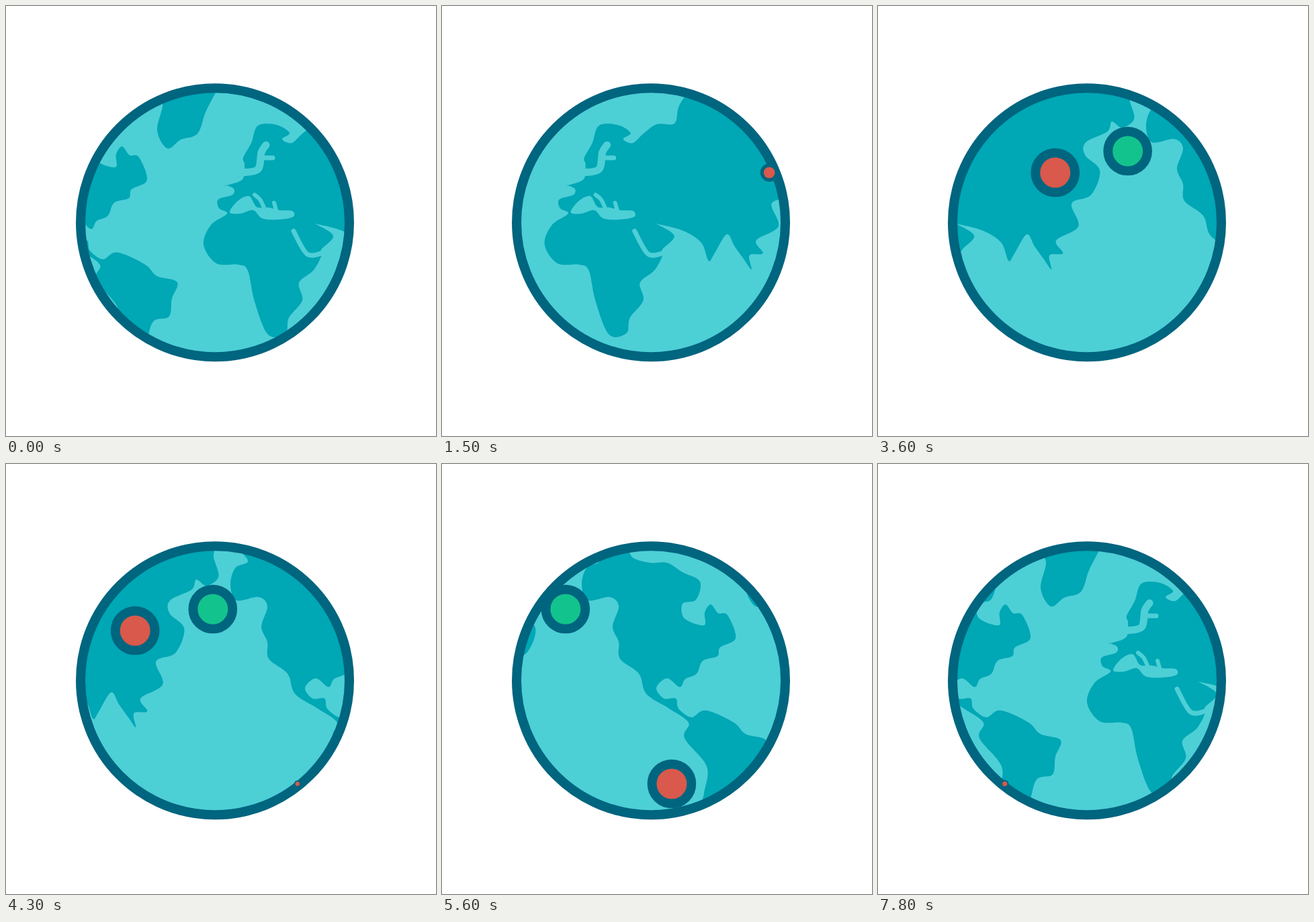
An HTML page for the animation above (7.9 s loop, 640 by 640 pixels).

```html
<!DOCTYPE html>
<html lang="en">
<head>
<meta charset="utf-8">
<title>Turning globe</title>
<style>
  html, body { margin: 0; width: 100%; height: 100%; overflow: hidden; background: #fff; }
  svg { display: block; width: 100vw; height: 100vh; }
  .land { fill: #00a7b5; }
  .sea { fill: #4dcfd6; }
  .strait { fill: none; stroke: #4dcfd6; stroke-linecap: round; }
  .rim { fill: none; stroke: #00657f; stroke-width: 14; }
  .pin { stroke: #00657f; stroke-width: 13.8; }
</style>
</head>
<body>
<svg viewBox="0 0 640 640">
  <defs>
    <circle id="ball" cx="311" cy="322.2" r="200"/>
    <clipPath id="disc"><use href="#ball"/></clipPath>
    <g id="world"></g>
  </defs>
  <use href="#ball" class="sea"/>
  <g clip-path="url(#disc)">
    <g id="map">
      <use href="#world"/>
      <use href="#world" x="762"/>
    </g>
  </g>
  <use href="#ball" class="rim"/>
  <g id="pins"></g>
</svg>
<script>
const STEP = 100, STEPS = 79;      // picture steps of 100 ms
const TICKS = 2.5, SPEED = 3.82;   // motion ticks per step, map pixels per tick
const LIFE = 91, GROW = 10;        // ticks a pin is seen, ticks to grow or shrink
const CENTER = 311;

// Key points of each coast, joined by a smooth curve; a doubled point is a corner.
const oldWorld = `188,309 176,301 175,288 196,281 198,272 187,267 187,267 211,258 214,236
  212,226 224,204 234,178 262,177 281,189 270,198 284,204 300,190 320,176 346,175 352,152
  361,136 375,126 400,135 430,129 450,138 470,128 480,112 570,110 577,140 584,168 566,181
  551,172 544,187 512,203 511,222 533,245 520,281 491,294 501,328 468,349 478,368 458,371
  461,392 449,376 436,358 424,340 405,370 397,379 386,352 358,334 319,324 319,324 346,342
  328,363 328,373 316,394 295,412 300,438 280,464 275,487 249,489 229,440 219,394 205,385
  172,383 153,355 164,326`;
const newWorld = `224,125 234,145 215,155 208,180 217,203 250,198 263,212 254,242 263,265
  265,290 293,312 304,342 338,364 367,385 361,408 394,450 390,490 384,525 420,530 435,505
  446,470 470,462 474,436 482,411 452,402 436,386 407,371 388,367 371,377 352,364 348,349
  330,349 319,333 335,319 354,332 362,320 379,312 388,293 410,286 414,273 437,259 425,225
  411,222 400,209 391,221 390,240 361,230 358,208 378,202 384,175 358,161 335,147 310,147
  285,140 270,123`;
const island = `214,112 220,129 233,146 225,185 240,212 260,199 285,190 297,158 312,129 322,108`;

const innerSea = `192,307 204,290 221,283 232,299 250,300 266,304 285,305 286,314 262,318
  240,316 227,304 208,309`;
const straits = [
  [11, '210,248 234,243 239,218 246,207'],
  [7, '243,226 256,226'],
  [6, '229,281 237,288 243,300'],
  [6, '258,293 262,307'],
  [7, '287,335 307,369 329,368'],
];

// each pin crosses its own parallel, reaching the middle at tick "mid"
const pins = [
  { y: 248, speed: 4.214, mid: 78.8, color: '#d9594c' },
  { y: 216, speed: 3.757, mid: 106.15, color: '#13c38d' },
  { y: 476, speed: 2.785, mid: 151.1, color: '#d9594c' },
];

function add(parent, tag, attrs) {
  const el = document.createElementNS('http://www.w3.org/2000/svg', tag);
  for (const key in attrs) el.setAttribute(key, attrs[key]);
  return parent.appendChild(el);
}

function smooth(text, closed = true) {
  const pts = text.trim().split(/\s+/).map(p => p.split(',').map(Number));
  const n = pts.length;
  const at = i => pts[closed ? (i + n) % n : Math.max(0, Math.min(n - 1, i))];
  const ctrl = (p, a, b) => p.map((v, k) => v + (b[k] - a[k]) / 6);
  let d = 'M' + pts[0];
  for (let i = 0; i < (closed ? n : n - 1); i++) {
    const p = at(i), q = at(i + 1);
    d += `C${ctrl(p, at(i - 1), q)} ${ctrl(q, at(i + 2), p)} ${q}`;
  }
  return d;
}

const world = document.getElementById('world');
const east = add(world, 'g', { transform: 'translate(141)' });
const west = add(world, 'g', { transform: 'translate(-227.2)' });
add(east, 'path', { class: 'land', d: smooth(oldWorld) });
add(east, 'path', { class: 'sea', d: smooth(innerSea) });
for (const [width, line] of straits) {
  add(east, 'path', { class: 'strait', 'stroke-width': width, d: smooth(line, false) });
}
add(west, 'path', { class: 'land', d: smooth(newWorld) });
add(world, 'path', { class: 'land', d: smooth(island) });

const map = document.getElementById('map');
const pinLayer = document.getElementById('pins');
for (const pin of pins) {
  pin.el = add(pinLayer, 'circle', { class: 'pin', r: 29.4, fill: pin.color });
}

function draw(ms) {
  const tick = Math.floor((Math.floor(ms / STEP) % STEPS) * TICKS);
  map.setAttribute('transform', `translate(${-tick * SPEED})`);
  for (const { el, y, speed, mid } of pins) {
    const away = tick - mid;
    const size = Math.max(0, Math.min(1, (LIFE / 2 - Math.abs(away)) / GROW));
    el.setAttribute('transform', `translate(${CENTER - away * speed} ${y}) scale(${size})`);
    el.setAttribute('visibility', size > 0 ? 'visible' : 'hidden');
  }
}

const start = performance.now();
function loop() {
  draw(performance.now() - start);
  requestAnimationFrame(loop);
}
loop();
</script>
</body>
</html>
```
